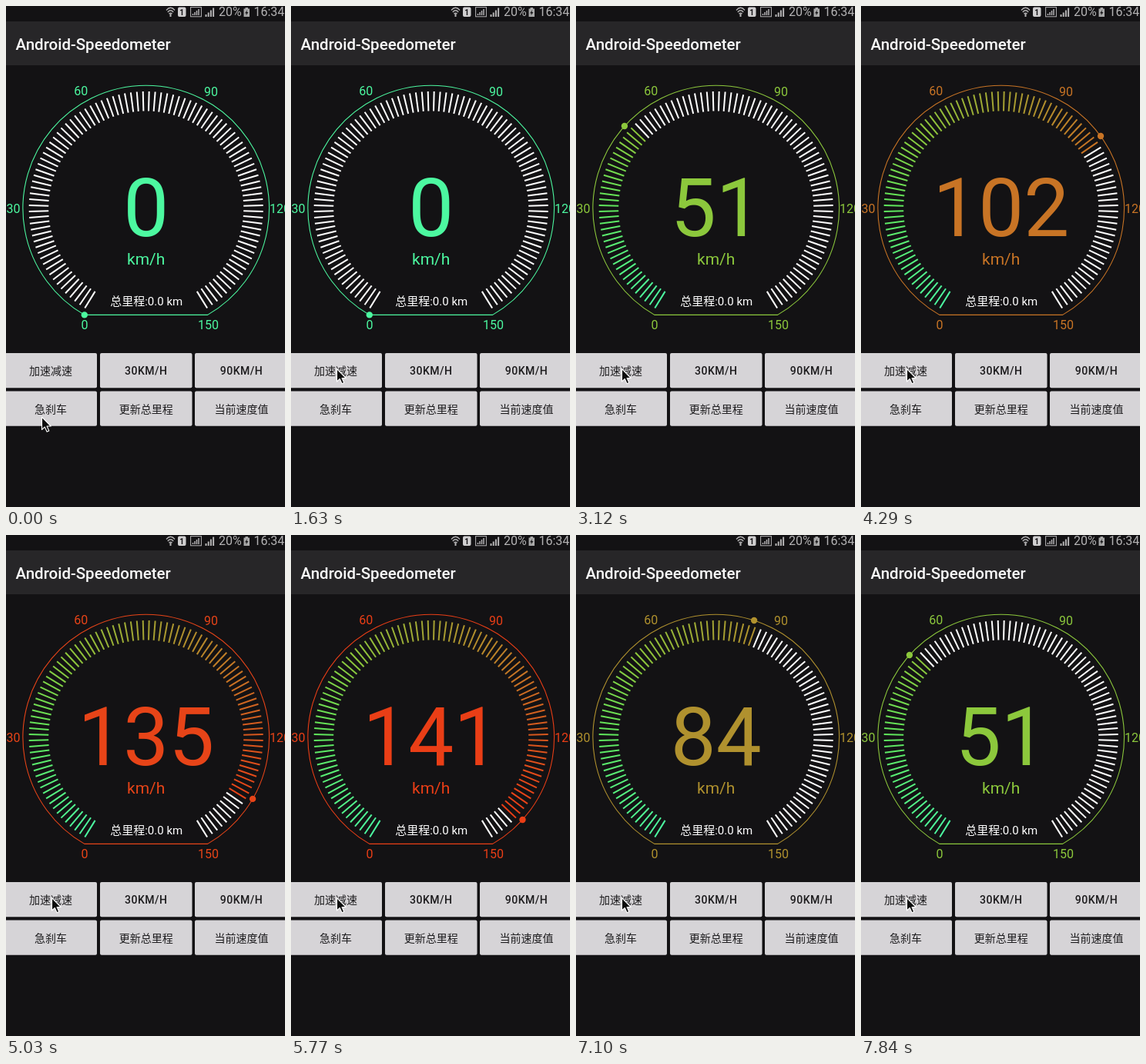
Recreate the animation shown at these times as an HTML page. Size 362 by 651 pixels, loop 7.99 s.

```html
<!DOCTYPE html>
<html lang="zh-CN">
<head>
<meta charset="utf-8">
<title>Android-Speedometer</title>
<style>
  html, body { margin: 0; width: 100%; height: 100%; overflow: hidden; background: #131214; }
  svg { display: block; width: 362px; height: 651px; }
  text { font-family: Roboto, "Noto Sans CJK SC", "Noto Sans CJK", sans-serif; }
  .mid { text-anchor: middle; }
  .theme { fill: var(--theme); }
  .scale { font-size: 16px; }
  .status { font-size: 16px; fill: #b4b3b4; }
  .label { font-size: 14px; fill: #1c1b1d; }
  .latin { font-weight: 500; letter-spacing: .5px; }
</style>
</head>
<body>
<svg id="stage" viewBox="0 0 362 651">
  <rect width="362" height="651" fill="#131214"/>
  <rect y="20" width="362" height="57" fill="#272628"/>

  <g fill="none" stroke="#b4b3b4" stroke-width="1.3">
    <path d="M208 5.5Q213.500 -1 219 5.500M209.800 8Q213.500 3.500 217.200 8M211.500 10.300Q213.500 8 215.500 10.300"/>
    <path d="M213.500 10V14" stroke-width="2"/>
    <rect x="239.600" y="1.600" width="13.800" height="12.200" stroke-width="1"/>
    <path d="M242.500 12V10M245 12V8M247.500 12V6M250 12V4" stroke-width="1.500"/>
    <path d="M259.500 14V11M262.700 14V8.500M265.900 14V5.500M269.100 14V2.500" stroke-width="2"/>
  </g>
  <rect x="223" y="1.500" width="10.500" height="12.500" rx="2" fill="#d0cfd0"/>
  <text class="mid" x="228.200" y="11.500" font-size="10" font-weight="700" fill="#131214">1</text>
  <path d="M310.500 2h3.500v1.500h2V14h-7.500V3.500h2z" fill="#a9a9a9"/>
  <path d="M313 5l-3 4.500h2l-.8 3 3.200-4.500h-2z" fill="#131214"/>
  <text class="status" x="276" y="13">20%</text>
  <text class="status" x="321.500" y="13">16:34</text>
  <text x="12.500" y="57" font-size="20.500" font-weight="500" fill="#fafafa">Android-Speedometer</text>

  <g id="dial">
    <path id="rim" fill="none" stroke="var(--theme)" stroke-width="1.100"/>
    <g id="ticks" stroke-width="2"></g>
    <circle id="dot" class="theme" r="4.200"/>
    <g id="scale"></g>
    <text id="speed" class="theme mid" x="181.700" y="298.500" font-size="105"></text>
    <text class="theme mid" x="181.700" y="336" font-size="21">km/h</text>
    <text class="mid" x="182.200" y="388.500" font-size="15" fill="#fff">总里程:0.0 km</text>
  </g>
  <g id="buttons"></g>
  <path id="cursor" d="M0 0V16.500L3.800 13 6.600 19.200 9.300 18 6.600 12H11.800Z"
    fill="#0c0c0c" stroke="#fff" stroke-width="1.100" stroke-linejoin="round"/>
</svg>
<script>
const LOOP = 7990, FRAMES = 54;
const CX = 181.7, CY = 263, R = 159.8;
const TICKS = 100, START = 120;
const STOPS = [
  [0, 76, 248, 160], [30, 96, 230, 92], [51, 140, 200, 60], [75, 164, 160, 50],
  [102, 200, 116, 37], [114, 210, 94, 31], [135, 231, 68, 24], [150, 238, 54, 20]
];

const $ = id => document.getElementById(id);

function add(parent, tag, attrs, text) {
  const el = document.createElementNS("http://www.w3.org/2000/svg", tag);
  for (const key in attrs) el.setAttribute(key, attrs[key]);
  if (text !== undefined) el.textContent = text;
  parent.appendChild(el);
  return el;
}

function polar(deg, r) {
  const a = deg * Math.PI / 180;
  return [CX + r * Math.cos(a), CY + r * Math.sin(a)];
}

function colorAt(v) {
  let i = 1;
  while (i < STOPS.length - 1 && v > STOPS[i][0]) i++;
  const a = STOPS[i - 1], b = STOPS[i];
  const p = Math.min(1, (v - a[0]) / (b[0] - a[0]));
  return `rgb(${[1, 2, 3].map(k => Math.round(a[k] + (b[k] - a[k]) * p))})`;
}

// Static parts
$("rim").setAttribute("d", `M${polar(START, R)}A${R} ${R} 0 1 1 ${polar(60, R)}Z`);

const ticks = Array.from({ length: TICKS }, (_, i) => {
  const deg = START + 1.5 + 3 * i;
  const [x1, y1] = polar(deg, 126.5), [x2, y2] = polar(deg, 152);
  return add($("ticks"), "line", { x1, y1, x2, y2 });
});
const tickColors = ticks.map((_, i) => colorAt(i * 1.5));

[[0, 102, 420], [30, 9.5, 269], [60, 97.3, 116], [90, 266, 117], [120, 355.5, 269], [150, 262.5, 420]]
  .forEach(([v, x, y]) => add($("scale"), "text", { class: "theme mid scale", x, y }, v));

const columns = [[-6, 124, 58], [122, 119.5, 181.8], [245, 124, 305.5]];
[["加速减速", "30KM/H", "90KM/H"], ["急刹车", "更新总里程", "当前速度值"]].forEach((row, r) => {
  row.forEach((label, c) => {
    const [x, width, mid] = columns[c], y = 451 + r * 49.6;
    add($("buttons"), "rect", { x, y, width, height: 45.2, rx: 2, fill: "#d6d4d7" });
    const kind = label.endsWith("H") ? "label mid latin" : "label mid";
    add($("buttons"), "text", { class: kind, x: mid, y: y + 28 }, label);
  });
});

// Speed climbs and falls in steps of 3, with a short rest at the top
function speedAt(t) {
  const up = Math.floor((t - 1925) / 68.8);
  const down = Math.floor((t - 5518) / 69);
  return 3 * (Math.min(50, Math.max(0, up)) - Math.max(0, down));
}

function cursorAt(t) {
  const p = Math.min(1, Math.max(0, t / 740));
  const e = p * p * (3 - 2 * p);
  return [46.5 + 13 * e, 534 - 62.5 * e];
}

let shown = -1;
function draw(now) {
  const frame = Math.floor((now % LOOP + 15) * FRAMES / LOOP) % FRAMES;
  if (frame !== shown) {
    shown = frame;
    const t = frame * LOOP / FRAMES, v = speedAt(t);
    $("dial").style.setProperty("--theme", colorAt(v));
    $("speed").textContent = v;
    ticks.forEach((el, i) =>
      el.setAttribute("stroke", v > 0 && i * 1.5 <= v ? tickColors[i] : "#fff"));
    const [x, y] = polar(START + 2 * v, R);
    $("dot").setAttribute("cx", x);
    $("dot").setAttribute("cy", y);
    $("cursor").setAttribute("transform", `translate(${cursorAt(t)})`);
  }
}

const begin = performance.now();
function loop() {
  draw(performance.now() - begin);
  requestAnimationFrame(loop);
}
loop();
</script>
</body>
</html>
```
